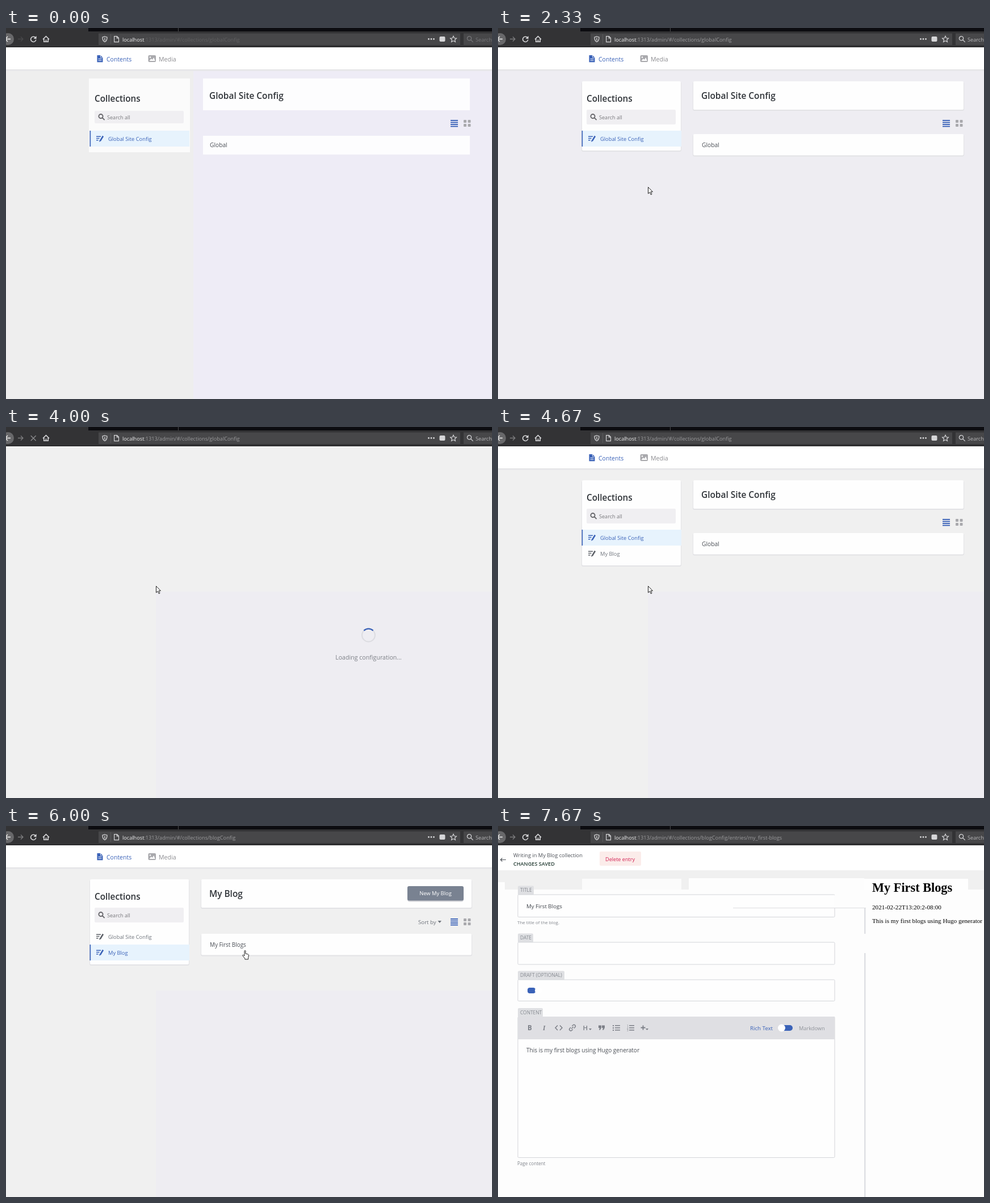
Recreate the animation shown at these times as an HTML page. Size 856x654 px, loop 8000 ms.

```html
<!DOCTYPE html>
<html lang="en">
<head>
<meta charset="utf-8">
<title>Site admin</title>
<style>
html, body { margin: 0; width: 100%; height: 100%; overflow: hidden; background: #fff; }
svg { display: block; width: 856px; height: 654px; font-family: "Open Sans", "Noto Sans", sans-serif; }
.serif { font-family: "Liberation Serif", "Times New Roman", serif; }
</style>
</head>
<body>
<svg id="stage" viewBox="0 0 856 654" xmlns="http://www.w3.org/2000/svg"></svg>
<script>
const LOOP = 8000;
const BLUE = '#3a62b8', INK = '#2f3338', GREY = '#6f747c', PALE = '#a9a9ad', CHROME = '#d6d6d8';

const text = (x, y, s, size, fill, more = '') =>
  `<text x="${x}" y="${y}" font-size="${size}" fill="${fill}" ${more}>${s}</text>`;
const rect = (x, y, w, h, fill, more = '') =>
  `<rect x="${x}" y="${y}" width="${w}" height="${h}" fill="${fill}" ${more}/>`;
const disc = (x, y, r, fill, more = '') =>
  `<circle cx="${x}" cy="${y}" r="${r}" fill="${fill}" ${more}/>`;
const line = (d, color, w = 1.3, more = '') =>
  `<path d="${d}" fill="none" stroke="${color}" stroke-width="${w}" ${more}/>`;
const shape = (d, fill, more = '') => `<path d="${d}" fill="${fill}" ${more}/>`;
const at = (x, y, body) => `<g transform="translate(${x} ${y})">${body}</g>`;
const card = (x, y, w, h) =>
  rect(x - 1, y + 1, w + 2, h + 1, '#e3e3e6', 'rx="3"') + rect(x, y, w, h, '#fefefe', 'rx="2"');
const magnifier = (x, y, color, w) =>
  line(`M${x + 3.6} ${y}a3.6 3.6 0 1 1-7.2 0a3.6 3.6 0 1 1 7.2 0M${x + 2.6} ${y + 2.6}l4 4`, color, w);

const reloadIcons = {
  ready: line('M52 17.2A4.6 4.6 0 1 0 52.8 20.5', CHROME, 1.6) + shape('M53.6 14v5h-5z', CHROME),
  busy: line('M45 23A4.6 4.6 0 1 1 51.4 23', CHROME, 1.6),
  stop: line('M43.7 15.2l9 9m0-9l-9 9', '#8c8c8e')
};

function browserBar({ path, reload = 'ready', soft }) {
  const faint = soft ? 'fill-opacity=".3"' : '';
  const url = `localhost<tspan fill="#9b9b9d" ${faint}>:1313/admin/#/collections/${path}</tspan>`;
  return rect(0, 0, 856, 34, '#333335') + rect(145, 0, 711, 6, '#0c0c10') + rect(303, 0, 1, 6, '#4a4a4c') +
    rect(0, 33, 856, 1, '#1c1c1e') +
    disc(3.5, 19.5, 10.5, '#68686a') +
    line('M8 19.5H-1M3 15l-4.5 4.5L3 24', '#eee', 1.5) +
    line('M21 19.5h9M26 15.5l4 4l-4 4', '#7c7c7e', 1.3, soft ? 'opacity=".3"' : '') +
    reloadIcons[reload] +
    line('M65 20l5.5-5.3L76 20M66.8 19v5.3h7.4V19M70.5 24v-3.6', CHROME, 1.6) +
    rect(163, 9.5, 637, 20.5, '#474749') + rect(806, 9.5, 50, 20.5, '#474749') +
    line('M174 15l4 1.2q.2 6-4 8.3q-4.2-2.3-4-8.3zM174 17.3v4.6', CHROME) +
    rect(184, 11, 1, 17, '#5a5a5c') +
    line('M190.7 14.6h4.8l3 3v7h-7.8zM195.3 14.8v3h3', CHROME, 1.2) +
    text(205, 23.6, url, 9.17, '#f0f0f0') +
    [744.5, 749, 753.5].map(x => disc(x, 19.5, 1.4, CHROME)).join('') +
    rect(763.5, 15, 10, 9, CHROME, 'rx="2"') +
    line('M788 14.3l1.6 3.5l3.8.4l-2.8 2.6l.8 3.7l-3.4-1.9l-3.4 1.9l.8-3.7l-2.8-2.6l3.8-.4z', CHROME, 1.2) +
    magnifier(816, 18.3, soft ? '#77777a' : CHROME, 1.3) +
    text(827, 23.6, 'Search', 9.2, soft ? '#77777a' : '#b8b8ba');
}

function backdrop({ tone }) {
  if (tone === 'split') return rect(0, 34, 856, 620, '#eeeeee') + rect(330, 73, 526, 581, '#eeecf6');
  if (tone === 'plain') return rect(0, 34, 856, 620, '#eeedf2');
  return rect(0, 34, 856, 620, '#f0f0f0') + rect(264, 290, 592, 364, '#eeedf2');
}

const pencil = (y, color) =>
  line(`M159 ${y - 3.8}h8M159 ${y - 0.5}h5.5M159 ${y + 2.8}h3.5`, color, 1.5) +
  line(`M171 ${y - 4.5}l-5 8.3`, color, 2.6) + shape(`M164.6 ${y + 2.5}l2.4 1.5l-2.6 2z`, color);

function sidebarRow(label, y, lit) {
  return (lit ? rect(148, y - 14, 175, 28, '#e7f3fd') + rect(147.5, y - 14, 1.7, 28, BLUE) : '') +
    pencil(y, lit ? BLUE : '#5d6168') + text(180, y + 3.6, label, 9.3, lit ? BLUE : GREY);
}

function sidebar({ active, hover, blog, soft }) {
  return (soft ? rect(146, 89, 178, 130, '#fbfbfb') : card(148, 94, 174, blog ? 150 : 122)) +
    text(156, 129.8, 'Collections', 15.3, INK, 'font-weight="600"') +
    rect(156, soft ? 146 : 144, 157, soft ? 22 : 26, '#f0eff2', 'rx="2"') +
    magnifier(167, 155.6, '#67676b', 1.9) + text(178, 160.6, 'Search all', 9.1, '#77777b') +
    sidebarRow('Global Site Config', 195, active === 'global') +
    (blog ? sidebarRow('My Blog', 223, active === 'blog' || hover) : '');
}

function topTabs() {
  return rect(0, 34, 856, 39, '#fff') + rect(0, 73, 856, 1, '#dfdfe2') + rect(0, 74, 856, 2, '#e9e9ec') +
    shape('M160.5 48h6l4 4v8.3h-10z', BLUE) + line('M162.5 54.5h6M162.5 57.3h6', '#fff', 1) +
    line('M166.5 48v4h4', '#fff', 0.8) + text(177, 58.7, 'Contents', 10.5, BLUE) +
    rect(250.5, 48, 13.5, 12, PALE, 'rx="2"') + shape('M252.5 58l3.2-4l2 2l2.6-4l2.4 6z', '#fff') +
    disc(254, 51.5, 1.3, '#fff') + text(269, 58.7, 'Media', 10.6, '#8d8d91');
}

function viewSwitch(y) {
  const bars = [-5.5, -2, 1.5, 5].map(d => rect(783, y + d - 0.5, 13, 1.9, BLUE)).join('');
  const tiles = [[0, 0], [7.5, 0], [0, 7], [7.5, 7]]
    .map(([dx, dy]) => rect(806 + dx, y - 6 + dy, 5, 5, PALE, 'rx="1"')).join('');
  return bars + tiles;
}

function loader(label, y, turn) {
  return disc(638.5, y, 11.5, 'none', 'stroke="#dcdce1" stroke-width="2"') +
    line(`M630.4 ${y - 8.1}a11.5 11.5 0 0 1 16.2 0`, BLUE, 2.2, `transform="rotate(${turn} 638.5 ${y})"`) +
    text(638.5, y + 42.6, label, 10.64, '#7d8087', 'text-anchor="middle"');
}

function blogActions() {
  return rect(707, 108, 99, 25.5, '#d3d4d8', 'rx="4"') + rect(707, 106, 99, 25.5, '#798291', 'rx="3"') +
    text(756.5, 122.3, 'New My Blog', 9.4, '#fff', 'text-anchor="middle"') +
    text(726, 172.7, 'Sort by', 9.7, GREY) + shape('M760.5 167h6.5l-3.2 4z', GREY);
}

function collection(s) {
  const own = s.active === 'blog';
  const page = backdrop(s) + topTabs() + sidebar(s) +
    (s.soft ? rect(347, 89, 470, 56, '#fdfdfe') : card(344, 94, 476, 50)) +
    text(358, 125.4, own ? 'My Blog' : 'Global Site Config', 15.4, INK, 'font-weight="600"') +
    viewSwitch(own ? 169 : 168) + (own ? blogActions() : '');
  if (s.loading) return page + loader('Loading Entries...', 379, 60);
  return page + (s.soft ? rect(347, 190, 470, 33, '#fdfdfe') : card(344, own ? 190 : 187, 476, 37.5)) +
    (own ? text(359, 212.5, 'My First Blogs', 9.9, '#4a4e55') : text(359, 210.3, 'Global', 10.2, '#4a4e55'));
}

function field(label, tabW, y, h) {
  return rect(35, y - 15, tabW, 16, '#dfe0e3', 'rx="2"') + text(39, y - 4.3, label, 8.4, '#84888f') +
    rect(35, y + 0.5, 558, h, '#fefefe', 'stroke="#d3d5d9" rx="1.5"');
}

function editorTools() {
  const c = '#7c7f87';
  const rows = x => [-4, 0, 4].map(d => rect(x + 4, 355 + d, 9, 1.5, c)).join('');
  const caret = x => shape(`M${x} 357h5l-2.5 3z`, c);
  const chain = line('M-1.5-2.5h-2.5a2.5 2.5 0 0 0 0 5h2.5M1.5-2.5h2.5a2.5 2.5 0 0 1 0 5h-2.5M-2.5 0h5', c, 1.4);
  return rect(35, 336, 558, 40, '#dfdfe3') +
    text(52, 360, 'B', 11.5, c, 'font-weight="700"') +
    text(79, 360, 'I', 11.5, c, 'font-style="italic" font-weight="700" class="serif"') +
    line('M105 351.5l-4 4.2l4 4.2M109 351.5l4 4.2l-4 4.2', c, 1.5) +
    at(131, 355.7, `<g transform="rotate(-45)">${chain}</g>`) +
    text(149.5, 360, 'H', 11.5, c, 'font-weight="600"') + caret(160) +
    [177, 183].map(x => shape(`M${x} 351.5h5v4l-2 4h-2l1-3.5h-2z`, c)).join('') +
    [-4, 0, 4].map(d => rect(202, 355 + d, 2, 2, c)).join('') + rows(202) +
    [1, 2, 3].map(n => text(227, 349.5 + n * 4, n, 4.5, c)).join('') + rows(227) +
    line('M251.5 355.5h8M255.5 351.5v8', c, 1.8) + caret(260) +
    text(444, 359.7, 'Rich Text', 9.7, BLUE) + rect(495, 351, 24, 10, BLUE, 'rx="5"') +
    disc(499.5, 356, 6.5, '#fff') + text(530, 359.7, 'Markdown', 9.2, '#8f9299');
}

// The grey strip under the header still shows the outlines of the cards that were there.
function leavingCards() {
  return rect(0, 78, 856, 34, '#f0f0f0') + rect(0, 99, 12, 13, '#fdfdfd') +
    rect(148, 93, 175, 19, '#fbfbfb') + rect(336, 92, 309, 20, '#fdfdfd') + rect(645, 93, 183, 19, '#fefefe');
}

function editor() {
  return rect(0, 34, 856, 620, '#fdfdfd') + leavingCards() + rect(0, 34, 856, 44, '#fff') +
    rect(645, 145, 2.5, 45, '#dfe0e4') + rect(645, 224, 2.5, 430, '#dfe0e4') +
    line('M14 59.5H4.5M7.5 56.5l-3 3l3 3', '#50545b', 1.2) +
    text(27, 54.7, 'Writing in My Blog collection', 9.27, '#4c5057') +
    text(27, 69.7, 'CHANGES SAVED', 9.1, '#243c33', 'font-weight="600"') +
    rect(179, 45, 73, 25, '#fbecea', 'rx="2"') + text(189, 61.5, 'Delete entry', 9.1, '#d32052') +
    field('TITLE', 28, 120.5, 39.5) + text(50, 144.7, 'My First Blogs', 9.75, '#3f434a') +
    rect(592, 122, 53, 23, '#fdfdfd') + rect(414, 144, 234, 1, '#dcdde0') +
    text(34, 173.3, 'The title of the blog.', 7.97, '#81858c') +
    field('DATE', 27, 204.5, 39) + field('DRAFT (OPTIONAL)', 82, 270.5, 37.5) +
    rect(52, 285, 14, 10, BLUE, 'rx="4"') + disc(71, 290, 6, '#fff') +
    field('CONTENT', 44, 336, 248) + editorTools() +
    text(50, 399, 'This is my first blogs using Hugo generator', 10.05, '#4a4e55') +
    text(34, 597.5, 'Page content', 8.1, '#81858c') +
    '<g class="serif">' + text(659, 116.3, 'My First Blogs', 22.3, '#000', 'font-weight="700"') +
    text(659, 146.7, '2021-02-22T13:20:2-08:00', 11.15, '#000') +
    text(659, 170.7, 'This is my first blogs using Hugo generator', 11.15, '#000') + '</g>';
}

const outline = 'stroke="#222" stroke-width="1"';
const cursors = {
  arrow: shape('M.5.5v11.5l2.7-2.5l2 4.3l1.8-.8l-2-4.2h3.5z', '#fff', outline),
  hand: shape('M4 9V1.6q0-1.1 1-1.1t1 1.1V6l4.6 1.2q1 .4.9 1.6l-.9 4.7v2.5H4.8v-1.5L1 9.8q-.8-1.2.4-1.6q1 0 2.6 1.8z', '#fff', outline)
};

const views = {
  collection,
  editor,
  blank: () => rect(0, 34, 856, 620, '#fefefe'),
  config: s => backdrop(s) + loader('Loading configuration...', 367, s.turn)
};

const first = { view: 'collection', path: 'globalConfig', active: 'global', tone: 'plain' };
const rest = { cursor: ['arrow', 264, 280] };
const config = { view: 'config', path: 'globalConfig', tone: 'inset', ...rest };
const reloaded = { ...first, tone: 'inset', blog: true };
const blog = { ...reloaded, path: 'blogConfig', active: 'blog' };

// Start time in ms, then what is on screen from there on.
const steps = [
  [0, { ...first, tone: 'split', soft: true }],
  [330, first],
  [1670, { ...first, ...rest }],
  [3670, { view: 'blank', path: 'globalConfig', reload: 'busy', ...rest }],
  [4000, { ...config, reload: 'stop', turn: 0 }],
  [4330, { ...config, turn: 120 }],
  [4670, { ...reloaded, ...rest }],
  [5000, { ...reloaded, cursor: ['arrow', 229, 266] }],
  [5330, { ...reloaded, hover: true, cursor: ['hand', 201, 227] }],
  [5670, { ...blog, loading: true, cursor: ['hand', 201, 227] }],
  [6000, { ...blog, cursor: ['hand', 416, 219] }],
  [7330, blog],
  [7670, { view: 'editor', path: 'blogConfig/entries/my_first-blogs' }]
];

const stage = document.getElementById('stage');
const start = performance.now();
let shown = -1;

function draw(s) {
  const pointer = s.cursor ? at(s.cursor[1], s.cursor[2], cursors[s.cursor[0]]) : '';
  stage.innerHTML = views[s.view](s) + browserBar(s) + pointer;
}

function tick() {
  const now = Math.max(0, performance.now() - start) % LOOP;
  let i = steps.length - 1;
  while (steps[i][0] > now) i--;
  if (i !== shown) draw(steps[shown = i][1]);
  requestAnimationFrame(tick);
}
tick();
</script>
</body>
</html>
```
